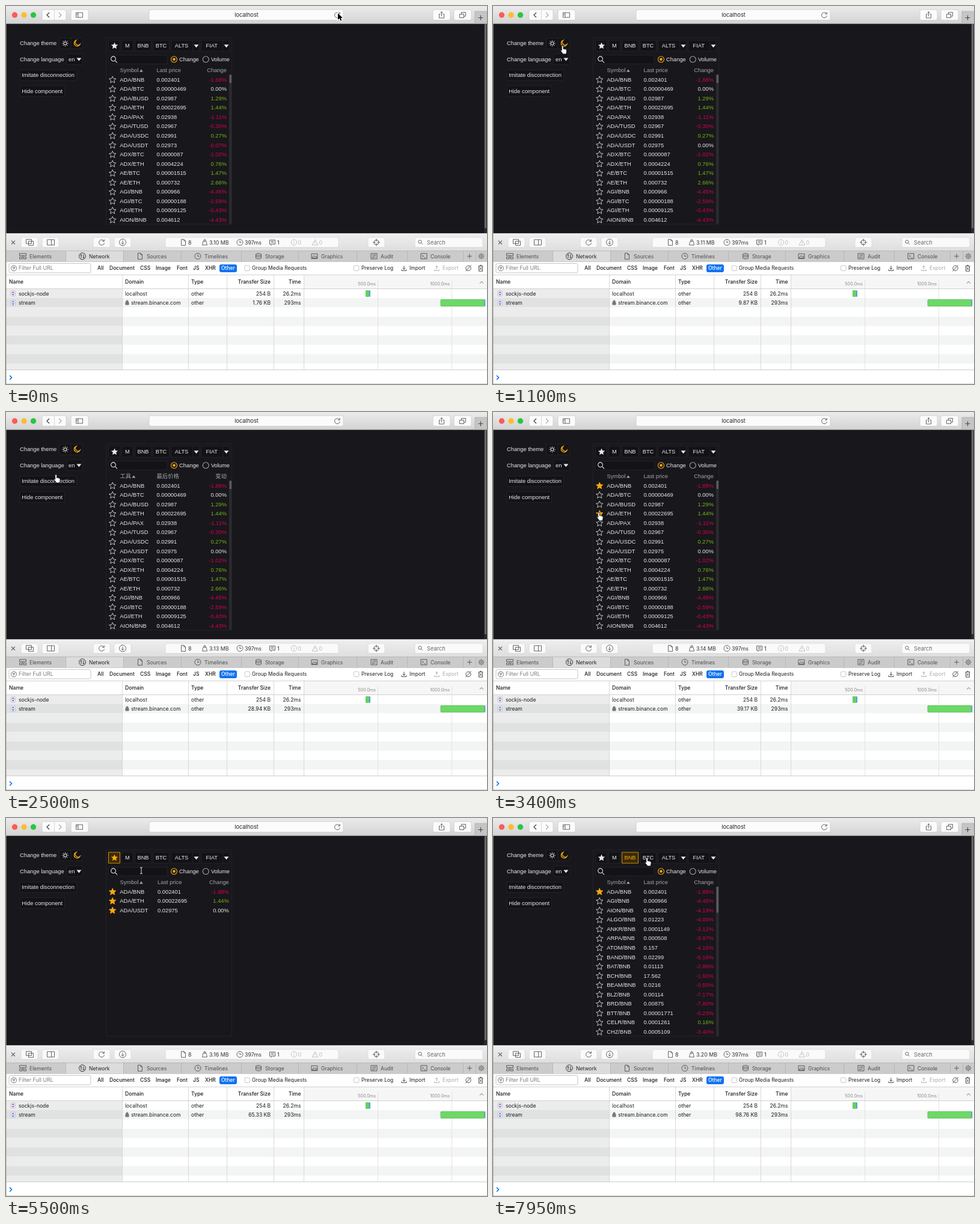
An HTML page with a canvas for the animation above (8000 ms loop, 800 by 629 pixels).

```html
<!DOCTYPE html>
<html lang="en">
<head>
<meta charset="utf-8">
<title>Market widget</title>
<style>
  html, body { margin: 0; width: 100%; height: 100%; overflow: hidden; background: #fff; }
  canvas { display: block; width: 800px; height: 629px; }
</style>
</head>
<body>
<canvas id="stage"></canvas>
<script>
const canvas = document.getElementById('stage');
const ctx = canvas.getContext('2d');
const dpr = window.devicePixelRatio || 1;
canvas.width = 800 * dpr;
canvas.height = 629 * dpr;

const LOOP = 8000, FRAME = 50, ROW = 15.55;
const UI = 'Inter, sans-serif';
const PAGE = '9.33px "Liberation Sans", "Noto Sans CJK SC", "Noto Sans CJK", sans-serif';
const AMBER = '#f5a90f';

const THEMES = {
  dark: { bg: '#18171c', box: '#131317', line: '#28272c', text: '#e8e8e8', head: '#a5a5a9', up: '#74b516',
          down: '#d4004f', track: '#2b2a2f', thumb: '#5b5b5f', ring: '#a5a5a9', bar: '#2a292e', barThumb: '#68686b' },
  light: { bg: '#ffffff', box: '#ffffff', line: '#cfcfcf', text: '#161616', head: '#858585', up: '#3fa00c',
           down: '#bd0033', track: '#e2e2e2', thumb: '#999999', ring: '#d8d8d8', bar: '#fafafa', barThumb: '#bdbdbd' }
};

const LANGS = {
  en: { panel: 166.5, theme: 88.5, select: 101, labels: ['Change theme', 'Change language'],
        buttons: ['Imitate disconnection', 'Hide component'], radios: ['Change', 'Volume'],
        heads: ['Symbol', 'Last price', 'Change'] },
  ru: { panel: 217.3, theme: 92.5, select: 92.5, labels: ['Изменить тему', 'Изменить язык'],
        buttons: ['Сымитировать обрыв соединения', 'Скрыть компонент'], radios: ['Изменение', 'Объем'],
        heads: ['Тикер', 'Цена', 'Изменение'] },
  ch: { panel: 142.5, theme: 64.5, select: 64.5, labels: ['更改主题', '更改语言'],
        buttons: ['模拟断线', '隐藏组件'], radios: ['变动', '成交量'],
        heads: ['工具', '最后价格', '变动'] }
};

const parse = list => list.trim().split('\n').map(line => line.trim().split(' '));
const ALL = parse(`ADA/BNB 0.002401 -1.88
  ADA/BTC 0.00000469 0.00
  ADA/BUSD 0.02987 1.29
  ADA/ETH 0.00022695 1.44
  ADA/PAX 0.02938 -1.11
  ADA/TUSD 0.02967 -0.30
  ADA/USDC 0.02991 0.27
  ADA/USDT 0.02975 0.00
  ADX/BTC 0.0000087 -1.02
  ADX/ETH 0.0004224 0.76
  AE/BTC 0.00001515 1.47
  AE/ETH 0.000732 2.66
  AGI/BNB 0.000966 -4.45
  AGI/BTC 0.00000188 -2.59
  AGI/ETH 0.00009125 -0.43
  AION/BNB 0.004612 -4.43`);
const BNB = parse(`ADA/BNB 0.002401 -1.88
  AGI/BNB 0.000966 -4.45
  AION/BNB 0.004592 -4.19
  ALGO/BNB 0.01223 -4.00
  ANKR/BNB 0.0001149 -3.12
  ARPA/BNB 0.000508 -3.97
  ATOM/BNB 0.157 -4.15
  BAND/BNB 0.02299 -5.16
  BAT/BNB 0.01113 -2.88
  BCH/BNB 17.562 -1.60
  BEAM/BNB 0.0216 -0.55
  BLZ/BNB 0.00114 -7.17
  BRD/BNB 0.00875 -7.80
  BTT/BNB 0.00001771 -0.23
  CELR/BNB 0.0001261 0.16
  CHZ/BNB 0.0005109 -3.40`);

// Timelines: [ms, value]
const THEME = [[0, 'dark'], [700, 'light'], [1000, 'dark']];
const LANG = [[0, 'en'], [1450, 'ru'], [1950, 'ch'], [2450, 'en']];
const OPEN = [[0, false], [1250, true], [1450, false], [1650, true], [1950, false], [2150, true], [2450, false]];
const TAB = [[0, ''], [4500, 'star'], [7500, 'BNB']];
const QUERY = [[0, ''], [6300, 'B'], [6600, 'BN'], [6850, 'BNB'], [7150, '']];
const STARS = [[3100, 'ADA/BNB'], [3400, 'ADA/ETH'], [3800, 'ADA/USDT']];
const TRAFFIC = [[0, 1.76], [950, 9.87], [1700, 20.23], [2500, 28.94], [4350, 51.96], [6750, 84.05], [7950, 98.76], [8000, 98.76]];
// [ms, x, y, pointer until the next step]
const POINTER = [
  [0, 552, 12, 'arrow'], [150, 552, 12, 'arrow'], [600, 98, 59, 'hand'], [720, 98, 59, 'hand'],
  [850, 116, 59, 'hand'], [1050, 116, 59, 'hand'], [1200, 114, 86, 'hand'], [1270, 114, 86, 'hand'],
  [1400, 108, 122, 'hand'], [1470, 108, 122, 'hand'], [1620, 109, 90, 'hand'], [1720, 109, 90, 'hand'],
  [1880, 102, 139, 'hand'], [1970, 102, 139, 'hand'], [2120, 84, 87, 'hand'], [2200, 84, 87, 'hand'],
  [2400, 83, 104, 'hand'], [2600, 83, 104, 'arrow'], [3000, 177, 120, 'hand'], [3120, 177, 120, 'hand'],
  [3320, 176, 167, 'hand'], [3450, 176, 167, 'hand'], [3700, 176, 229, 'hand'], [3850, 176, 229, 'hand'],
  [4250, 182, 66, 'hand'], [4900, 182, 66, 'hand'], [5400, 225, 87, 'beam'], [6150, 225, 87, ''],
  [6900, 225, 87, 'beam'], [7050, 225, 87, 'hand'], [7350, 228, 66, 'hand'], [7600, 228, 66, 'hand'],
  [7900, 256, 66, 'hand'], [8000, 256, 66, 'hand']
];

const ring = (r, x = 0, y = 0) => `M${x + r} ${y}a${r} ${r} 0 1 1 ${-2 * r} 0a${r} ${r} 0 1 1 ${2 * r} 0`;
const starPath = r => 'M' + Array.from({ length: 10 }, (_, i) => {
  const a = i * Math.PI / 5, k = i % 2 ? r * 0.46 : r;
  return `${(k * Math.sin(a)).toFixed(2)} ${(-k * Math.cos(a)).toFixed(2)}`;
}).join('L') + 'z';
const rays = Array.from({ length: 8 }, (_, i) => {
  const c = Math.cos(i * Math.PI / 4), s = Math.sin(i * Math.PI / 4);
  return `M${4 * c} ${4 * s}L${5.3 * c} ${5.3 * s}`;
}).join('');

const ICON = {
  star: starPath(6), sun: ring(2.5) + rays,
  moon: 'M-1.5 -5A5 5 0 1 0 5 1.5A4.6 4.6 0 0 1 -1.5 -5z',
  glass: ring(3.9, -1, -1) + 'M1.8 1.8L5.5 5.5',
  small: ring(2.6, -1, -1) + 'M1 1L3.4 3.4',
  down: 'M-4 -2H4L0 3z', up: 'M-4 2H4L0 -3z', sort: 'M-3 2H3L0 -2z',
  hand: 'M0 0c1.6 0 1.6 1 1.6 2v3.5l1-.3 1 .6 1.2-.2 1 .8 1 .2c.8 3-.2 4.5-.6 7.4h-5.5c-1-2.5-3-4-4-6 .2-1 1.5-.8 2 .2V1.5C-1.3.5-1 0 0 0z',
  arrow: 'M0 0V11l2.6-2.4 1.8 4 2-.9-1.8-3.8H8z',
  beam: 'M-2 -5q2 0 2 2V4q0 2-2 2M2 -5q-2 0-2 2M2 6q-2 0-2-2',
  left: 'M2 -4L-2 0L2 4', right: 'M-2 -4L2 0L-2 4', plus: 'M-4 0H4M0 -4V4', cross: 'M-3 -3L3 3M3 -3L-3 3',
  side: 'M-5.5 -4H5.5V4H-5.5zM-2 -4V4M-4.5 -2h1.5M-4.5 0h1.5',
  split: 'M-6 -4.5H6V4.5H-6zM1 -4.5V4.5',
  windows: 'M-6 -5H3V2H-6zM-2 -2H6V5H-2z', pages: 'M-5 -1.5H2V4.5H-5zM-2 -1.5V-4.5H5V2H2',
  share: 'M-2 -1.5H-4V5H4V-1.5H2M0 2V-5.5M-2 -3.5L0 -5.5L2 -3.5',
  reload: 'M4 -2A4.5 4.5 0 1 0 4.5 1M4.3 -5V-1.8H1',
  save: ring(5.5) + 'M0 -3V3M-2.3 .8L0 3L2.3 .8',
  doc: 'M-3.5 -5H1L3.5 -2.5V5H-3.5zM1 -5V-2.5H3.5',
  weight: 'M-2.5 -2H2.5L4 4.5H-4z' + ring(1.5, 0, -3.5),
  clock: ring(5) + 'M0 -3V.3H2.5', note: 'M-4.5 -4H4.5V3H0L-2 5V3H-4.5zM-2.5 -1.8H2.5M-2.5 .6H2.5',
  info: ring(4.7) + 'M0 -1V2.5M0 -2.8V-2', warn: 'M0 -4.5L5 4.5H-5zM0 -1.5V1.5M0 2.5V3.2',
  target: ring(4) + 'M-6 0H-1.5M6 0H1.5M0 -6V-1.5M0 6V1.5',
  tree: 'M-5.5 -4.5H5.5V-1H-5.5zM-5.5 1.5H-1V4.5H-5.5zM1 1.5H5.5V4.5H1zM0 -1V1.5',
  net: ring(5.5) + 'M-2 3V-3M-3.5 -1.5L-2 -3L-.5 -1.5M2 -3V3M.5 1.5L2 3L3.5 1.5',
  disks: 'M-4.5 -3a4.5 1.6 0 1 1 9 0a4.5 1.6 0 1 1 -9 0V3.2q4.5 3 9 0V-3M-4.5 0q4.5 3 9 0',
  image: 'M-5 -4H5V4H-5zM-4 3L-1 -1L1 1L2.5 -.5L4 3z', audit: 'M-5 -4.5H5V4.5H-5zM-3 -1.5H3L1 -3M3 1.5H-3L-1 3',
  term: 'M-5 -4.5H5V4.5H-5zM-3 -2L-.5 0L-3 2M.5 2.5H3',
  gear: ring(3.4) + ring(1.3) + rays, funnel: ring(4.5) + 'M-2.5 -1.5H2.5M-1.7 .2H1.7M-.7 1.9H.7',
  load: 'M0 -4V2M-2.3 -.3L0 2L2.3 -.3M-4 2V4H4V2', send: 'M0 2V-4M-2.3 -1.7L0 -4L2.3 -1.7M-4 2V4H4V2',
  none: ring(4.2) + 'M4.5 -5L-4.5 5', trash: 'M-4 -3.5H4M-1 -3.5V-5H1V-3.5M-3 -3.5V5H3V-3.5M-1.8 -1.5L1.8 3M1.8 -1.5L-1.8 3',
  chevron: 'M-3 1.5L0 -1.5L3 1.5', prompt: 'M-1.7 -3.4L1.7 0L-1.7 3.4', socket: 'M-1.8 -.8L0 -2.6L1.8 -.8M-1.8 .8L0 2.6L1.8 .8',
  lock: 'M-2.6 -.5H2.6V3.5H-2.6zM-1.7 -.5V-2a1.7 1.7 0 0 1 3.4 0V-.5'
};
for (const key in ICON) ICON[key] = new Path2D(ICON[key]);

function at(table, t) {
  let value = table[0][1];
  for (const [time, v] of table) if (time <= t) value = v;
  return value;
}

function rect(x, y, w, h, fill, stroke, r = 0) {
  ctx.beginPath();
  ctx.roundRect(x, y, w, h, r);
  if (fill) { ctx.fillStyle = fill; ctx.fill(); }
  if (stroke) { ctx.strokeStyle = stroke; ctx.lineWidth = 0.8; ctx.stroke(); }
}

function icon(name, x, y, stroke, fill, width = 0.9) {
  ctx.save();
  ctx.translate(x, y);
  if (fill) { ctx.fillStyle = fill; ctx.fill(ICON[name]); }
  if (stroke) { ctx.strokeStyle = stroke; ctx.lineWidth = width; ctx.stroke(ICON[name]); }
  ctx.restore();
}

function text(s, x, y, color, font = PAGE, align = 'left') {
  ctx.font = font;
  ctx.fillStyle = color;
  ctx.textAlign = align;
  ctx.fillText(s, x, y);
}

function ui(s, x, y, color = '#1c1c1c', size = 8.6, align = 'left', weight = 400) {
  text(s, x, y, color, `${weight} ${size}px ${UI}`, align);
}

function width(s) {
  ctx.font = PAGE;
  return ctx.measureText(s).width;
}

function shade(y, h, top, bottom) {
  const g = ctx.createLinearGradient(0, y, 0, y + h);
  g.addColorStop(0, top);
  g.addColorStop(1, bottom);
  rect(0, y, 800, h, g);
}

function drawBrowser() {
  shade(0, 29.5, '#ebebeb', '#d3d3d3');
  rect(0, 28.7, 800, 0.8, '#aeaeae');
  ['#fc5b57', '#fdbc2f', '#2ac640'].forEach((c, i) => {
    ctx.beginPath();
    ctx.arc(14.5 + i * 15.5, 15, 4.7, 0, 7);
    ctx.fillStyle = c;
    ctx.fill();
  });
  for (const [x, w] of [[60, 40], [108, 29], [238, 323], [710, 29], [745, 29]]) rect(x, 6, w, 17.5, '#fbfbfb', '#cdcdcd', 3);
  rect(80, 6, 0.8, 17.5, '#d0d0d0');
  icon('left', 70, 15, '#444', null, 1.3);
  icon('right', 90, 15, '#aaa', null, 1.2);
  icon('side', 122, 15, '#555');
  ui('localhost', 400, 18.4, '#222', 9.3, 'center');
  icon('reload', 551, 15, '#555');
  icon('share', 724.5, 15, '#555');
  icon('pages', 759.5, 15, '#555');
  rect(780, 9, 20, 20, '#c5c5c5', '#adadad');
  icon('plus', 789.5, 19.5, '#444', null, 1.1);
}

function drawDevtools(kb) {
  shade(378, 29, '#efefef', '#dedede');
  rect(0, 378, 800, 0.8, '#b9b9b9');
  icon('cross', 12, 393.5, '#666', null, 1.1);
  for (const [x, w] of [[25, 28], [60, 28], [145, 28], [180, 28], [265, 288], [602, 28], [680, 113]]) rect(x, 385, w, 16.5, '#fafafa', '#d8d8d8', 3);
  [['windows', 39.5], ['split', 74.5], ['reload', 159], ['save', 194], ['target', 616], ['small', 689.5], ['doc', 295],
   ['weight', 330.5], ['clock', 389], ['note', 443]].forEach(([n, x]) => icon(n, x, 393.3, '#555'));
  icon('info', 479, 393.3, '#bbb');
  icon('warn', 514, 393.3, '#bbb');
  [['8', 303], [(3.101 + kb / 1024).toFixed(2) + ' MB', 338], ['397ms', 397], ['1', 451]].forEach(([s, x]) => ui(s, x, 396.6, '#333', 8.9));
  ui('0', 485.5, 396.6, '#bbb', 8.9);
  ui('0', 520.5, 396.6, '#bbb', 8.9);
  ui('Search', 700, 396.6, '#6b6b6b', 9.3);

  rect(0, 407, 800, 18.5, '#cbcbcb');
  rect(99, 407, 96, 18.5, '#dcdcdc');
  [99, 195, 291, 391, 486, 583, 667, 760, 781].forEach(x => rect(x, 407, 0.8, 18.5, '#b2b2b2'));
  rect(0, 407, 800, 0.8, '#b2b2b2');
  rect(0, 425, 800, 0.8, '#b2b2b2');
  [['Elements', 39, 'tree'], ['Network', 138, 'net'], ['Sources', 234, 'doc'], ['Timelines', 330, 'clock'], ['Storage', 431, 'disks'],
   ['Graphics', 524, 'image'], ['Audit', 623, 'audit'], ['Console', 706, 'term']].forEach(([s, x, n]) => {
    const color = s === 'Network' ? '#222' : '#4d4d4d';
    icon(n, x - 11, 416.3, color);
    ui(s, x, 419.6, color);
  });
  icon('plus', 771, 416.3, '#555');
  icon('gear', 790.5, 416.3, '#555');

  rect(0, 425.8, 800, 22, '#fff');
  rect(5, 428.5, 136, 15.5, '#fff', '#b5b5b5', 2.5);
  icon('funnel', 13, 436.3, '#666');
  ui('Filter Full URL', 21, 439.4, '#7c7c7c', 8.9);
  rect(355, 430, 29, 13, '#0f72f2', null, 3);
  [['All', 152], ['Document', 172], ['CSS', 223], ['Image', 249], ['Font', 284], ['JS', 311], ['XHR', 331], ['Other', 358]]
    .forEach(([s, x]) => ui(s, x, 439.4, s === 'Other' ? '#fff' : '#1c1c1c', 8.5, 'left', 500));
  [397, 578.5].forEach(x => rect(x, 432, 8.5, 8.5, '#fff', '#b9b9b9', 2));
  ui('Group Media Requests', 409, 439.4, '#222', 8.5);
  ui('Preserve Log', 591, 439.4, '#222', 8.5);
  icon('load', 662, 436.3, '#333');
  ui('Import', 671, 439.4, '#222');
  icon('send', 716.5, 436.3, '#aaa');
  ui('Export', 726, 439.4, '#aaa');
  icon('none', 769, 436.3, '#444');
  icon('trash', 789.5, 436.3, '#444');

  drawRequests(kb);
}

function drawRequests(kb) {
  rect(0, 447.5, 800, 23, '#fff');
  rect(496, 447.5, 304, 23, '#f6f6f6');
  for (let i = 0; i < 9; i++) {
    const y = 470.5 + i * ROW, h = Math.min(ROW, 605.5 - y);
    rect(0, y, 800, h, i % 2 ? '#f3f4f4' : '#fff');
    rect(0, y, 193.5, h, i % 2 ? '#e0e1e1' : '#ececec');
  }
  [193.3, 303, 367.3, 445, 495.3].forEach(x => rect(x, 447.5, 0.8, 158, '#cfcfcf'));
  [618, 741].forEach(x => rect(x, 456, 0.8, 149.5, '#dedede'));
  [447.3, 470, 605.3].forEach(y => rect(0, y, 800, 0.8, '#c4c4c4'));
  [['Name', 5], ['Domain', 198], ['Type', 308]].forEach(([s, x]) => ui(s, x, 462.4, '#1c1c1c', 8.6, 'left', 500));
  ui('Transfer Size', 440, 462.4, '#1c1c1c', 8.6, 'right', 500);
  ui('Time', 490.5, 462.4, '#1c1c1c', 8.6, 'right', 500);
  ui('500.0ms', 615, 464.6, '#8a8a8a', 7.2, 'right');
  ui('1000.0ms', 738, 464.6, '#8a8a8a', 7.2, 'right');
  icon('chevron', 791, 460, '#555');

  [['sockjs-node', 'localhost', '254 B', '26.2ms', '#7b5aa0'], ['stream', 'stream.binance.com', kb.toFixed(2) + ' KB', '293ms', '#4b72bd']]
    .forEach(([name, domain, size, time, color], i) => {
      const y = 478.4 + i * ROW;
      rect(8, y - 4.5, 7.5, 9, '#f4f2fb', '#b9b4cf', 1.5);
      icon('socket', 11.7, y, color, null, 1.2);
      ui(name, 21, y + 3.1);
      ui(domain, i ? 208 : 198, y + 3.1);
      ui('other', 308, y + 3.1);
      ui(size, 440, y + 3.1, '#1c1c1c', 8.6, 'right');
      ui(time, 490.5, y + 3.1, '#1c1c1c', 8.6, 'right');
    });
  icon('lock', 201.5, 493.6, '#777', '#777');
  rect(598, 473, 6, 11, '#63d163', null, 1);
  rect(604, 473, 2, 11, '#5a9fd0', null, 1);
  rect(723, 488.6, 73, 10.8, '#6dd867', '#55c152', 1);
  rect(795.5, 488.6, 1.7, 10.8, '#5a9fd0');
  rect(0, 606, 800, 23, '#fff');
  icon('prompt', 7.8, 618.3, '#0f72f2', null, 1.6);
  rect(0, 628.2, 800, 0.8, '#c8c8c8');
  rect(0, 29, 0.6, 600, '#a5a5a5');
}

function drawControls(t, c, themeName, langName) {
  const lang = LANGS[langName], light = themeName === 'light';
  text(lang.labels[0], 23, 65.4, c.text);
  text(lang.labels[1], 23, 91.8, c.text);
  rect(lang.theme, 53.3, 19.3, 18, light ? '#f0f0f0' : c.box, c.line);
  rect(lang.theme + 19.3, 53.3, 19.3, 18, light && t >= 800 ? '#dcdcdc' : c.box, c.line);
  icon('sun', lang.theme + 10, 62.2, light ? AMBER : c.text, null, 1.1);
  icon('moon', lang.theme + 29.5, 62.2, light ? c.text : AMBER, null, 1.4);
  lang.buttons.forEach((s, i) => {
    rect(23.2, 106.3 + i * 26.4, width(s) + 6.4, 17.7, c.box, c.line);
    text(s, 26.2, 118.4 + i * 26.4, c.text);
  });
  const open = at(OPEN, t), x = lang.select, arrow = x + 10 + width(langName);
  rect(x, 79.7, arrow + 6 - x, 17.7, c.box, c.line);
  text(langName, x + 3, 91.8, c.text);
  icon(open ? 'up' : 'down', arrow, 88.6, null, c.text);
  if (!open) return;
  rect(x, 98, arrow + 6 - x, 52.5, c.bg, c.line);
  ['en', 'ru', 'ch'].forEach((s, i) => text(s, x + 4.7, 110.2 + i * 17.1, c.text));
}

function drawTabs(x, c, active) {
  [['star', 4, 19, 14], ['M', 26, 19, 35.5], ['BNB', 48, 27, 61.5], ['BTC', 78, 27, 91.5], ['ALTS', 108, 47, 125.5], ['FIAT', 158, 47, 175.8]]
    .forEach(([s, left, w, mid]) => {
      const on = s === active, color = on ? AMBER : c.text;
      rect(x + left, 57, w, 18.2, on ? '#3b2b08' : c.box, on ? AMBER : c.line);
      if (s === 'star') icon('star', x + mid, 66.4, null, color);
      else text(s, x + mid, 69.3, color, PAGE, 'center');
      if (w > 40) {
        rect(x + left + 36, 57, 0.7, 18.2, c.line);
        icon('down', x + left + 42, 66.2, null, c.text);
      }
    });
}

function drawFilter(x, c, radios, query) {
  let end = x + 205.5;
  for (const i of [1, 0]) {
    const start = end - width(radios[i]), mid = start - 8.6;
    text(radios[i], start, 92, c.text);
    ctx.beginPath();
    ctx.arc(mid, 88.8, 5, 0, 7);
    ctx.strokeStyle = i ? c.ring : AMBER;
    ctx.lineWidth = 1.1;
    ctx.stroke();
    if (!i) {
      ctx.beginPath();
      ctx.arc(mid, 88.8, 2.3, 0, 7);
      ctx.fillStyle = AMBER;
      ctx.fill();
    }
    end = mid - 11.5;
  }
  rect(x + 4, 81.8, end - x - 4, 14.4, c.box, c.line);
  icon('glass', x + 13, 88.8, c.text, null, 1.1);
  text(query, x + 23, 92.2, c.text);
}

function listRows(t, tab, query) {
  const starred = STARS.filter(([time]) => time <= t).map(s => s[1]);
  const rows = tab === 'BNB' ? BNB : tab === 'star' ? ALL.filter(r => starred.includes(r[0])) : ALL;
  return { starred, rows: rows.filter(r => r[0].includes(query)) };
}

function drawPanel(t, c, langName) {
  const lang = LANGS[langName], x = lang.panel;
  const tab = at(TAB, t), query = at(QUERY, t);
  const { starred, rows } = listRows(t, tab, query);
  const scroll = rows.length > 15;
  const price = x + (scroll ? 84 : 85.5), right = x + (scroll ? 200.5 : 204.3);
  rect(x, 53, 209.2, 310, c.bg, c.line);
  drawTabs(x, c, tab);
  drawFilter(x, c, lang.radios, query);

  // Column heads follow a language change a little later.
  const heads = LANGS[at(LANG, Math.max(0, t - 100))].heads;
  text(heads[0], x + 23, 110, c.head);
  icon('sort', x + 27.3 + width(heads[0]), 107.6, null, c.head);
  text(heads[1], price, 110, c.head);
  text(heads[2], right, 110, c.head, PAGE, 'right');

  rows.forEach(([symbol, cost, change], i) => {
    const y = 122.5 + i * ROW, on = starred.includes(symbol);
    if (symbol === 'ADA/USDT' && t < 500) [cost, change] = ['0.02973', '-0.07'];
    const color = +change > 0 ? c.up : +change < 0 ? c.down : c.text;
    icon('star', x + 10.7, y + 0.4, on ? AMBER : c.text, on ? AMBER : null, 0.8);
    text(symbol, x + 22.7, y + 3.2, c.text);
    text(cost, price, y + 3.2, c.text);
    text(change + '%', right, y + 3.2, color, PAGE, 'right');
  });
  if (scroll) {
    rect(x + 204.5, 114, 4.4, 248.6, c.track);
    rect(x + 205, 114.5, 3.6, tab === 'BNB' ? 43 : 13.5, c.thumb);
  }
}

function drawPointer(t) {
  const i = POINTER.findLastIndex(p => p[0] <= t);
  const a = POINTER[i], b = POINTER[i + 1];
  const k = (t - a[0]) / (b[0] - a[0]), e = k * k * (3 - 2 * k);
  const x = a[1] + (b[1] - a[1]) * e, y = a[2] + (b[2] - a[2]) * e;
  if (a[3] === 'beam') icon('beam', x, y, '#ddd', null, 1);
  else if (a[3] === 'hand') icon('hand', x, y, '#111', '#fff', 1);
  else if (a[3]) {
    icon('arrow', x, y, '#fff', null, 1.8);
    icon('arrow', x, y, null, '#000');
  }
}

function traffic(t) {
  const i = Math.min(TRAFFIC.findLastIndex(p => p[0] <= t), TRAFFIC.length - 2);
  const [t0, v0] = TRAFFIC[i], [t1, v1] = TRAFFIC[i + 1];
  const bursts = Math.max(1, Math.round((t1 - t0) / 200));
  return v0 + (v1 - v0) * Math.floor((t - t0) / (t1 - t0) * bursts) / bursts;
}

function draw(t) {
  const themeName = at(THEME, t), c = THEMES[themeName], langName = at(LANG, t);
  ctx.setTransform(dpr, 0, 0, dpr, 0, 0);
  rect(0, 29, 800, 350, c.bg);
  rect(795, 29.5, 5, 349, c.bar);
  rect(796, 30, 3, 340, c.barThumb, null, 1.5);
  drawBrowser();
  drawControls(t, c, themeName, langName);
  drawPanel(t, c, langName);
  drawDevtools(traffic(t));
  drawPointer(t);
}

let start;
function tick(now) {
  start ??= now;
  draw(Math.floor(((now - start) % LOOP) / FRAME) * FRAME);
  requestAnimationFrame(tick);
}
draw(0);
requestAnimationFrame(tick);
</script>
</body>
</html>
```
